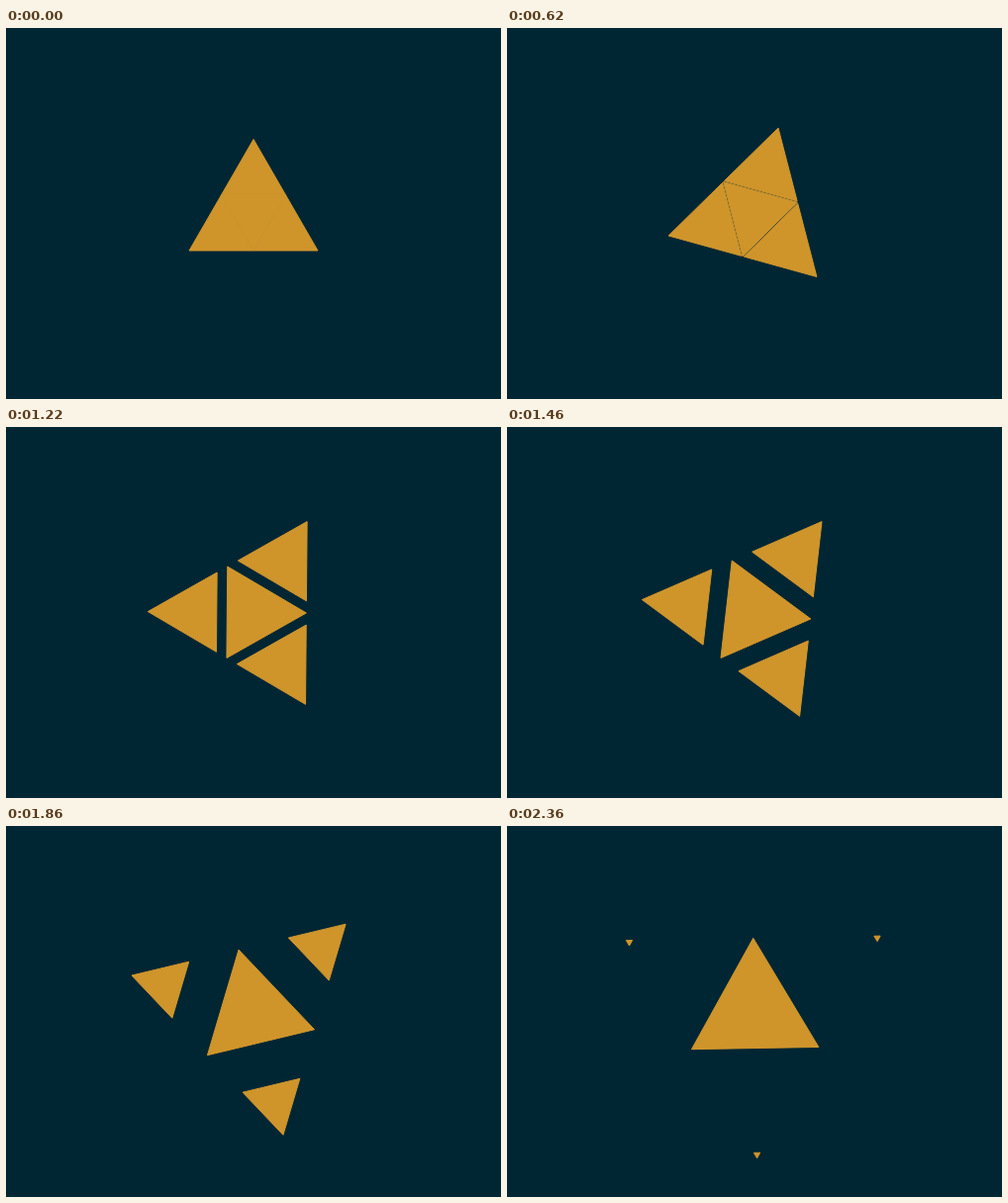
An HTML page with a canvas for the animation above (2.38 s loop, 500 px wide and 375 px high).

```html
<!DOCTYPE html>
<html lang="en">
<head>
<meta charset="utf-8">
<title>Triangle zoom</title>
<style>
  html, body { margin: 0; width: 100%; height: 100%; overflow: hidden; background: #002633; }
  canvas { display: block; }
</style>
</head>
<body>
<canvas id="stage" width="500" height="375"></canvas>
<script>
const ctx = document.getElementById('stage').getContext('2d');
const LOOP = 2380, STEP = 20, STEPS = 120;
const CX = 250, CY = 187.5, RADIUS = 75;
const TURN = Math.PI * 2 / 3;

// Point at a clockwise angle from straight up
const polar = (x, y, r, a) => [x + r * Math.sin(a), y - r * Math.cos(a)];

function triangle(x, y, r, angle) {
  ctx.beginPath();
  for (let i = 0; i < 3; i++) ctx.lineTo(...polar(x, y, r, angle + i * TURN));
  ctx.closePath();
  ctx.fill();
  ctx.stroke();
}

function draw(ms) {
  const p = Math.floor((ms % LOOP) / STEP + 0.01) / STEPS;
  const outer = RADIUS * 2 ** p;
  const half = outer / 2;
  const angle = p * Math.PI / 3;
  const small = half * (1 - p ** 3);

  ctx.fillStyle = '#002633';
  ctx.fillRect(0, 0, 500, 375);
  ctx.fillStyle = ctx.strokeStyle = '#cf952b';
  ctx.lineWidth = 1;
  ctx.lineJoin = 'bevel';

  triangle(CX, CY, half, angle + Math.PI);
  // Corner pieces shrink towards the outer tips
  for (let i = 0; i < 3; i++) {
    const a = angle + i * TURN;
    triangle(...polar(CX, CY, outer - small, a), small, a);
  }
}

const start = performance.now();
function tick(now) {
  draw(Math.max(0, now - start));
  requestAnimationFrame(tick);
}
draw(0);
requestAnimationFrame(tick);
</script>
</body>
</html>
```
